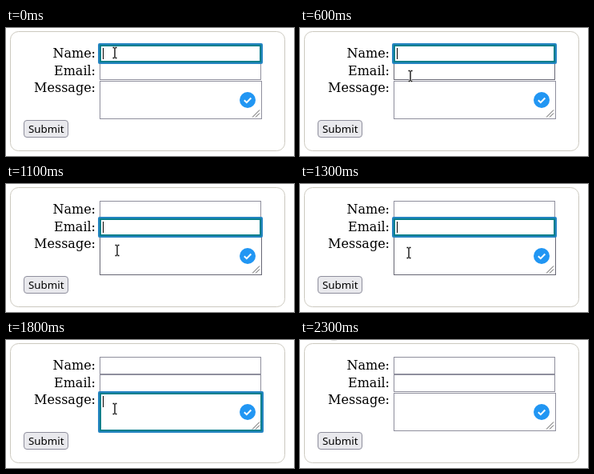
An HTML page for the animation above (2500 ms loop, 360 by 160 pixels).

```html
<!DOCTYPE html>
<html lang="en">
<head>
<meta charset="utf-8">
<title>Form focus</title>
<style>
  html, body { margin: 0; width: 100%; height: 100%; overflow: hidden; background: #fff; }
  svg { display: block; width: 360px; height: 160px; }
  .label { font: 16px "DejaVu Serif", serif; text-anchor: end; }
  .button { font: 13.33px "Noto Sans", sans-serif; }
  .field { fill: #fff; stroke: #8f8f9d; }
  .field.hover { stroke: #676774; }
  .line { fill: none; }
</style>
</head>
<body>
<svg viewBox="0 0 360 160">
  <rect class="line" x="5.5" y="4.5" width="343" height="149" rx="10" stroke="#ccc9bf"/>
  <text class="label" x="112" y="37">Name:</text>
  <text class="label" x="112" y="59">Email:</text>
  <text class="label" x="112" y="80">Message:</text>
  <rect x="22.5" y="115.5" width="55" height="21" rx="3.5" fill="#e9e9ed" stroke="#8f8f9d"/>
  <text class="button" x="28" y="131">Submit</text>

  <g id="fields"></g>

  <g id="focus">
    <rect id="ring" class="line" stroke="#2585c2" stroke-width="2"/>
    <rect id="edge" class="line" stroke="#087f8c" stroke-width="2"/>
    <path id="caret" class="line" stroke="#000"/>
  </g>

  <path class="line" d="M308 111.5l9-9M312 111.5l5-5" stroke="#555" stroke-width="1"/>
  <circle cx="302" cy="90" r="10" fill="#2196f3"/>
  <path class="line" d="M297.8 90.3l3 2.9l5.5-5.7" stroke="#fff" stroke-width="2"/>

  <g id="beam" class="line">
    <path d="M-3 -6.5H3M0 -6.5V6.5M-3 6.5H3" stroke="#fff" stroke-width="3"/>
    <path d="M-2.5 -6.5H-.5M.5 -6.5H2.5M0 -6V6M-2.5 6.5H-.5M.5 6.5H2.5" stroke="#000" stroke-width="1.3"/>
  </g>
  <path id="arrow" d="M0 0V17.5L4 14.5H7L12 12Z" stroke="#fff" stroke-width="1" paint-order="stroke"/>
  <ellipse id="trace" cx="42.5" cy="-.8" rx="4.5" ry="1.8" fill="#ddd"/>
</svg>
<script>
const LOOP = 2500, STEP = 100;
const byId = id => document.getElementById(id);
const show = (el, on) => el.setAttribute("visibility", on ? "visible" : "hidden");
const setAttrs = (el, attrs) => {
  for (const name in attrs) el.setAttribute(name, attrs[name]);
};

// Outer bounds of the name, email and message fields
const boxes = [
  { x: 117, y: 21, w: 202, h: 22 },
  { x: 117, y: 43, w: 202, h: 22 },
  { x: 117, y: 66, w: 203, h: 48 }
];

const inset = ({ x, y, w, h }, by) =>
  ({ x: x + by, y: y + by, width: w - 2 * by, height: h - 2 * by });

const fields = boxes.map(box => {
  const rect = document.createElementNS("http://www.w3.org/2000/svg", "rect");
  setAttrs(rect, { class: "field", ...inset(box, 0.5) });
  byId("fields").append(rect);
  return rect;
});

// Pointer path: time, x, y
const path = [
  [0, 136, 31], [100, 136, 33], [300, 137, 46], [500, 138, 60], [800, 138, 61],
  [900, 138, 66], [1100, 139, 83], [1300, 136, 86], [1800, 136, 86],
  [1900, 104, 42], [2000, 60, -9], [2100, 48, -14], [2200, 38, -18]
];

function pointerAt(t) {
  const next = path.findIndex(key => key[0] > t);
  if (next < 0) return path[path.length - 1].slice(1);
  const [t0, x0, y0] = path[next - 1], [t1, x1, y1] = path[next];
  const k = (t - t0) / (t1 - t0);
  return [Math.round(x0 + (x1 - x0) * k), Math.round(y0 + (y1 - y0) * k)];
}

function focusAt(t) {
  if (t < 800) return 0;
  if (t < 1800) return 1;
  return t < 2300 ? 2 : -1;
}

function draw(t) {
  const [x, y] = pointerAt(t);
  const focused = focusAt(t);

  fields.forEach((rect, i) => {
    const { x: left, y: top, w, h } = boxes[i];
    const inside = x > left && x < left + w && y >= top && y < top + h;
    rect.classList.toggle("hover", inside);
  });

  show(byId("focus"), focused >= 0);
  if (focused >= 0) {
    const box = boxes[focused];
    setAttrs(byId("ring"), { ...inset(box, -1), rx: 1 });
    setAttrs(byId("edge"), inset(box, 1));
    byId("caret").setAttribute("d", `M121.5 ${box.y + 4}v14`);
  }

  const place = `translate(${x} ${y})`;
  setAttrs(byId("beam"), { transform: place });
  setAttrs(byId("arrow"), { transform: place });
  show(byId("beam"), t < 1900);
  show(byId("arrow"), t >= 1900 && t < 2200);
  show(byId("trace"), t >= 2200);
}

const start = performance.now();
function tick() {
  const t = (performance.now() - start) % LOOP;
  draw(Math.floor(t / STEP) * STEP);
  requestAnimationFrame(tick);
}
tick();
</script>
</body>
</html>
```
